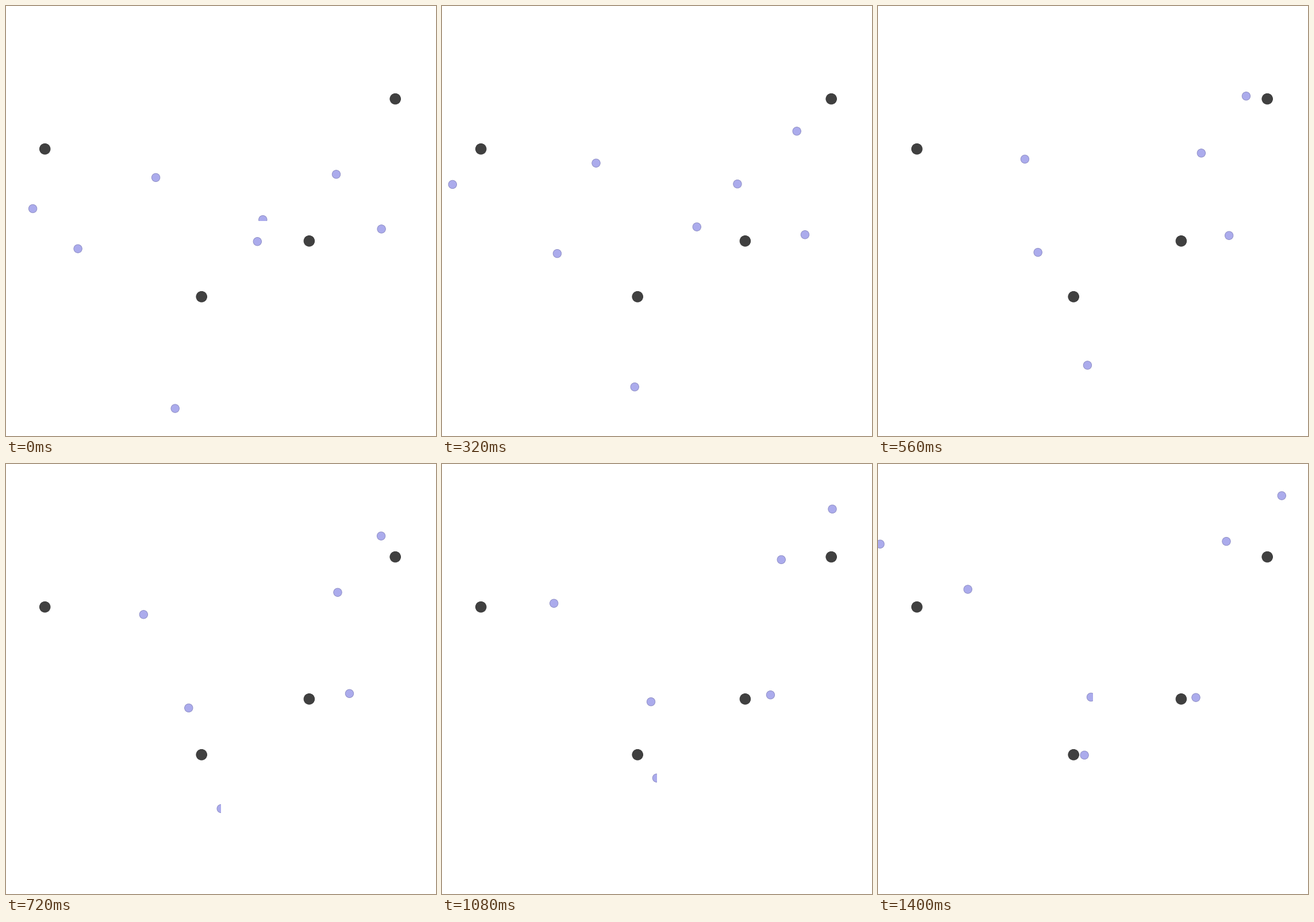
These frames come from a looping animation (748 by 748 pixels, 1.44 s). A matplotlib script:

```python
import numpy as np
import matplotlib.pyplot as plt
from matplotlib.animation import FuncAnimation
from matplotlib.patches import Circle, Rectangle

SIZE, TILE, DPI = 748, 374, 100
FRAMES, INTERVAL = 36, 40
PX = 72 / DPI

ANCHORS = [(67.7, 248.7), (677.2, 161.6), (527.4, 408.8), (340.2, 505.7)]

# Key points of each drifting dot, evenly spread over the shared pace
PATHS = [
    [(46.6, 352.5), (10, 298.7), (-22, 227.6), (3.7, 139.3)],
    [(260.6, 298.4), (266.5, 270.8), (234.7, 260.3), (156.3, 218)],
    [(125.1, 422.2), (221.7, 430.8), (325.7, 423.2), (370.5, 405.5)],
    [(294.2, 700.1), (344.3, 653), (375.5, 593.2), (359.1, 506.4)],
    [(446.8, 371.6), (509, 313.8), (561.8, 256.8), (584, 194.7), (606, 134.6)],
    [(437.3, 409.7), (459.6, 315)],
    [(574.5, 292.8), (624.3, 200.5), (655.5, 118.5), (702.3, 55.1)],
    [(653.1, 387.9), (626, 398.6), (594.3, 399.4), (553, 406.2)],
]


def smooth_curve(points):
    """Coefficients of the polynomial through evenly spaced key points."""
    steps = np.linspace(0, 1, len(points))
    return np.polyfit(steps, np.array(points), len(points) - 1)


def pace(frame):
    """Start from rest, speed up quickly, then slow down gradually."""
    w = (frame / (FRAMES - 1)) ** 1.5
    return 3 * w / (1 + 2 * w)


def flip(point):
    return point[0], SIZE - point[1]


fig = plt.figure(figsize=(SIZE / DPI, SIZE / DPI), dpi=DPI, facecolor="white")
ax = fig.add_axes([0, 0, 1, 1])
ax.set(xlim=(0, SIZE), ylim=(0, SIZE))
ax.axis("off")


def add_dot(point, radius, face, edge):
    return ax.add_patch(Circle(flip(point), radius, fc=face, ec=edge, lw=0.9 * PX))


for point in ANCHORS:
    add_dot(point, 9.3, "#404040", "#383838")

# Each dot is visible only inside the quarter of the stage it starts in
dots = []
for path in PATHS:
    dot = add_dot(path[0], 7.2, "#ababec", "#8c8cc4")
    col, row = path[0][0] // TILE, path[0][1] // TILE
    dot.set_clip_path(Rectangle((col * TILE, (1 - row) * TILE), TILE, TILE,
                                transform=ax.transData))
    dots.append(dot)

curves = [smooth_curve(path) for path in PATHS]


def update(frame):
    u = pace(frame)
    for dot, curve in zip(dots, curves):
        dot.center = flip(np.polyval(curve, u))
    return dots


anim = FuncAnimation(fig, update, frames=FRAMES, interval=INTERVAL,
                     repeat=True, repeat_delay=0, blit=False)
plt.show()
```
